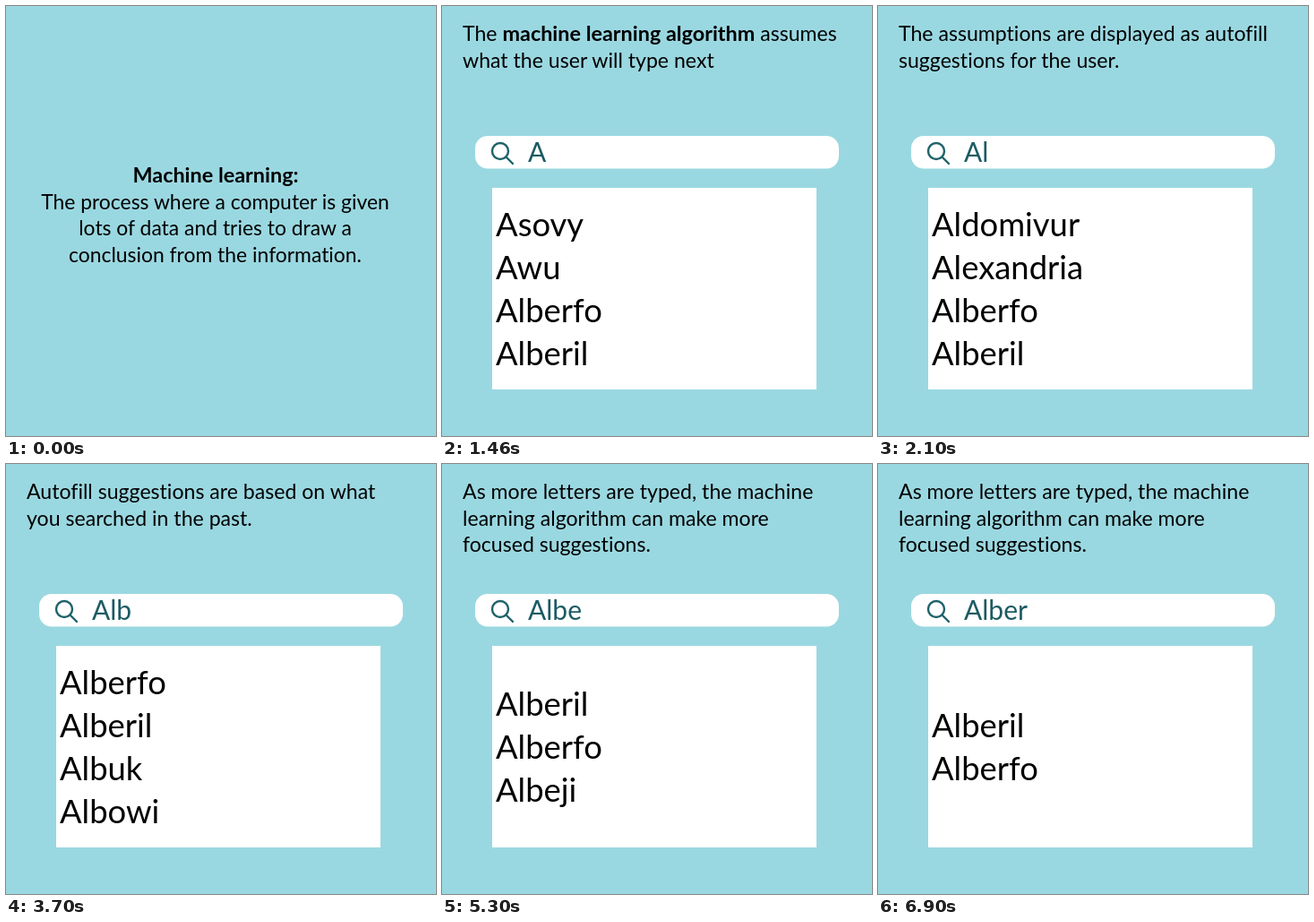
Animation, 480 px wide and 480 px high, one loop 8 s. Source, as an HTML page:

```html
<!DOCTYPE html>
<html lang="en">
<head>
<meta charset="utf-8">
<title>Machine learning and autofill</title>
<style>
  html, body { margin: 0; width: 100%; height: 100%; overflow: hidden; background: #9ad8e1; }
  svg { display: block; width: 100vw; height: 100vh; }
  text { font-family: Lato, sans-serif; font-variant-ligatures: none; }
  .note { font-size: 23.1px; }
  .center { font-size: 22.9px; text-anchor: middle; }
  .bold { font-size: 23.4px; font-weight: 700; }
  .query { font-size: 30px; fill: #1c5b63; }
  .list { font-size: 36.4px; }

  .scene { animation: 8s step-end infinite; }
  #intro { animation-name: intro; }
  #field { animation-name: field; }
  #one { animation-name: one; }
  #two { animation-name: two; }
  #three { animation-name: three; }
  #focus { animation-name: focus; }
  #four { animation-name: four; }
  #five { animation-name: five; }

  @keyframes intro { 0% { opacity: 1 } 6.25%, 100% { opacity: 0 } }
  @keyframes field { 0% { opacity: 0 } 6.25%, 100% { opacity: 1 } }
  @keyframes one { 0%, 26.25%, 100% { opacity: 0 } 6.25% { opacity: 1 } }
  @keyframes two { 0%, 46.25%, 100% { opacity: 0 } 26.25% { opacity: 1 } }
  @keyframes three { 0%, 66.25%, 100% { opacity: 0 } 46.25% { opacity: 1 } }
  @keyframes focus { 0% { opacity: 0 } 66.25%, 100% { opacity: 1 } }
  @keyframes four { 0%, 86.25%, 100% { opacity: 0 } 66.25% { opacity: 1 } }
  @keyframes five { 0% { opacity: 0 } 86.25%, 100% { opacity: 1 } }
</style>
</head>
<body>
<svg viewBox="0 0 480 480">
  <rect width="480" height="480" fill="#9ad8e1"/>

  <g id="intro" class="scene center">
    <text class="bold" x="234" y="197">Machine learning:</text>
    <text x="233.5" y="227">The process where a computer is given</text>
    <text x="233.5" y="256">lots of data and tries to draw a</text>
    <text x="233.5" y="286">conclusion from the information.</text>
  </g>

  <!-- Search bar and suggestion panel -->
  <g id="field" class="scene">
    <rect x="37" y="145" width="406" height="36.5" rx="14" fill="#fff"/>
    <g fill="none" stroke="#1f626a" stroke-width="2.4" stroke-linecap="round">
      <circle cx="65" cy="162" r="9"/>
      <path d="M71.5 168.5L79 176"/>
    </g>
    <rect x="56" y="203" width="362" height="225" fill="#fff"/>
  </g>

  <g id="one" class="scene">
    <g class="note">
      <text x="23" y="39">The <tspan class="bold">machine learning algorithm</tspan> assumes</text>
      <text x="23" y="69">what the user will type next</text>
    </g>
    <text class="query" x="96" y="174">A</text>
    <g class="list">
      <text x="60" y="257">Asovy</text>
      <text x="60" y="305">Awu</text>
      <text x="60" y="353">Alberfo</text>
      <text x="60" y="401">Alberil</text>
    </g>
  </g>

  <g id="two" class="scene">
    <g class="note">
      <text x="23" y="39">The assumptions are displayed as autofill</text>
      <text x="23" y="69">suggestions for the user.</text>
    </g>
    <text class="query" x="96" y="174">Al</text>
    <g class="list">
      <text x="60" y="257">Aldomivur</text>
      <text x="60" y="305">Alexandria</text>
      <text x="60" y="353">Alberfo</text>
      <text x="60" y="401">Alberil</text>
    </g>
  </g>

  <g id="three" class="scene">
    <g class="note">
      <text x="23" y="39">Autofill suggestions are based on what</text>
      <text x="23" y="69">you searched in the past.</text>
    </g>
    <text class="query" x="96" y="174">Alb</text>
    <g class="list">
      <text x="60" y="257">Alberfo</text>
      <text x="60" y="305">Alberil</text>
      <text x="60" y="353">Albuk</text>
      <text x="60" y="401">Albowi</text>
    </g>
  </g>

  <!-- Heading shared by the last two scenes -->
  <g id="focus" class="scene note">
    <text x="23" y="39">As more letters are typed, the machine</text>
    <text x="23" y="69">learning algorithm can make more</text>
    <text x="23" y="98">focused suggestions.</text>
  </g>

  <g id="four" class="scene">
    <text class="query" x="96" y="174">Albe</text>
    <g class="list">
      <text x="60" y="281">Alberil</text>
      <text x="60" y="329">Alberfo</text>
      <text x="60" y="377">Albeji</text>
    </g>
  </g>

  <g id="five" class="scene">
    <text class="query" x="96" y="174">Alber</text>
    <g class="list">
      <text x="60" y="305">Alberil</text>
      <text x="60" y="353">Alberfo</text>
    </g>
  </g>
</svg>
</body>
</html>
```
